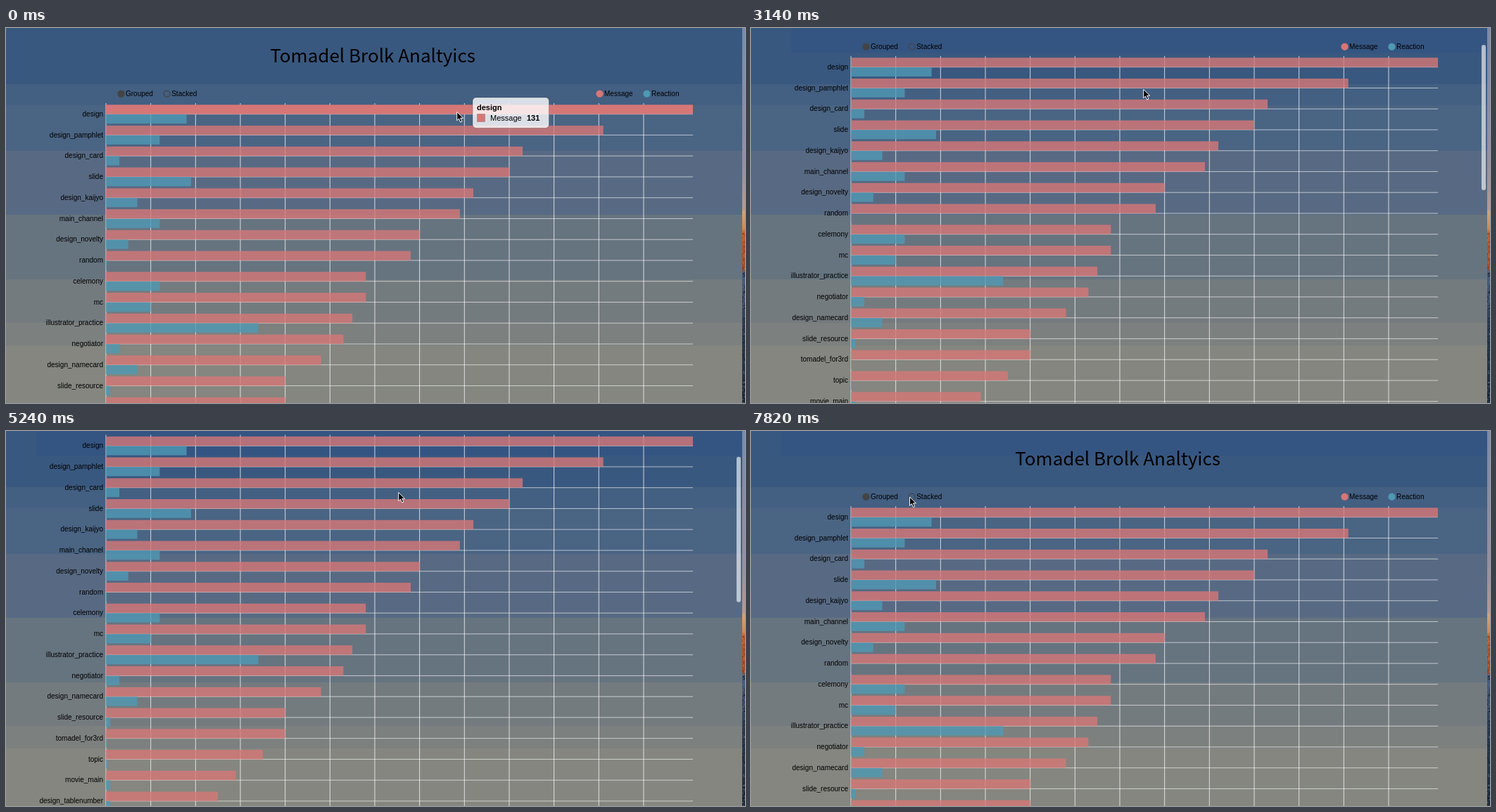
An HTML page for the animation above (8 s loop, 1050x534 px).

```html
<!DOCTYPE html>
<html lang="en">
<head>
<meta charset="utf-8">
<title>Channel analytics</title>
<style>
  html, body { margin: 0; width: 100%; height: 100%; overflow: hidden; background: #6b7580; }
  svg { display: block; width: 1050px; height: 534px; }
  text { font: 10px "Liberation Sans", Arial, sans-serif; fill: #000; }
  .title { font: 26px "Noto Sans CJK JP", "Noto Sans CJK", "Noto Sans", sans-serif; }
  .heading { font-size: 23.8px; font-weight: bold; }
  .key { font-size: 16px; }
  .tip { font-size: 11px; }
  .bold { font-weight: bold; }
  .middle { text-anchor: middle; }
  .end { text-anchor: end; }
</style>
</head>
<body>
<svg id="stage" viewBox="0 0 1050 534"></svg>
<script>
const LOOP = 8000;
const stage = document.getElementById('stage');

function add(parent, tag, attrs, text) {
  const node = document.createElementNS('http://www.w3.org/2000/svg', tag);
  for (const name in attrs) node.setAttribute(name, attrs[name]);
  if (text !== undefined) node.textContent = text;
  parent.appendChild(node);
  return node;
}
const rect = (parent, x, y, width, height, fill, more) =>
  add(parent, 'rect', { x, y, width, height, fill, ...more });
const label = (parent, x, y, text, cls = '') =>
  add(parent, 'text', { x, y, class: cls }, text);
const line = (parent, x1, y1, x2, y2, stroke, width = 1) =>
  add(parent, 'line', { x1, y1, x2, y2, stroke, 'stroke-width': width });

// Backdrop: fixed bands of colour behind the scrolling page
const bands = [
  [0, '#39587f'], [80, '#435f82'], [110, '#4a6483'], [175, '#586a83'],
  [266, '#667480'], [358, '#747b7f'], [420, '#7c807f'], [452, '#84867f']
];
bands.forEach(([y, fill], i) => {
  const bottom = i + 1 < bands.length ? bands[i + 1][0] : 534;
  rect(stage, 0, y, 1046, bottom - y, fill);
});
const shade = rect(stage, 57, 0, 989, 35, '#345582');

// Sliver of desktop at the right edge
const defs = add(stage, 'defs', {});
const desk = add(defs, 'linearGradient', { id: 'desk', x1: 0, y1: 0, x2: 0, y2: 1 });
[[0, '#7c89a8'], [.38, '#97909f'], [.485, '#b59a92'], [.49, '#d3a477'], [.535, '#cf8a55'],
 [.55, '#b9572b'], [.64, '#a04c2c'], [.655, '#4c5f80'], [.75, '#33445c'], [1, '#1c2838']]
  .forEach(([offset, color]) => add(desk, 'stop', { offset, 'stop-color': color }));
rect(stage, 1046, 0, 4, 534, 'url(#desk)');
let seed = 7;
const random = () => (seed = seed * 16807 % 2147483647) / 2147483647;
for (let i = 0; i < 110; i++) {
  const y = 292 + random() * 242;
  const fill = y < 345 ? (random() < .5 ? '#e08a45' : '#70381f') : (random() < .4 ? '#60738c' : '#141d2b');
  rect(stage, 1046 + random() * 3, y, 1.5, 2, fill, { opacity: .6 });
}

// Bar chart
const page = add(stage, 'g', {});
const LEFT = 142, RIGHT = 976, TOP = 107, BOTTOM = 704, ROW = 29.75;
const RED = '#d67777', BLUE = '#4f99b4', DARK = '#444';
const unit = (RIGHT - LEFT) / 131;
const channels = [
  ['design', 131, 18], ['design_pamphlet', 111, 12], ['design_card', 93, 3],
  ['slide', 90, 19], ['design_kaijyo', 82, 7], ['main_channel', 79, 12],
  ['design_novelty', 70, 5], ['random', 68, 0], ['celemony', 58, 12],
  ['mc', 58, 10], ['illustrator_practice', 55, 34], ['negotiator', 53, 3],
  ['design_namecard', 48, 7], ['slide_resource', 40, 1], ['tomadel_for3rd', 40, 0],
  ['topic', 35, 0], ['movie_main', 29, 1], ['design_tablenumber', 25, 1],
  ['eval_dis_competition', 25, 0], ['now_2017', 21, 0]
];

label(page, 521, 48.5, 'Tomadel Brolk Analtyics', 'title middle');

function legendDot(x, text, fill, stroke) {
  add(page, 'circle', { cx: x, cy: 93.7, r: 4.5, fill, stroke, 'stroke-width': 1.3 });
  label(page, x + 6.5, 97.3, text);
}
legendDot(163.5, 'Grouped', DARK, DARK);
legendDot(228.7, 'Stacked', 'none', DARK);
legendDot(843.5, 'Message', RED, RED);
legendDot(910.5, 'Reaction', BLUE, BLUE);

for (let v = 0; v <= 120; v += 10) {
  const x = LEFT + v * unit;
  line(page, x, TOP, x, BOTTOM, 'rgba(255,255,255,.75)');
  label(page, x, 714, v, v ? 'middle' : 'middle bold');
}
label(page, RIGHT, 714, 131, 'middle bold');

const bars = channels.map(([name, messages, reactions], i) => {
  const y = 122.7 + i * ROW;
  line(page, LEFT, y, RIGHT, y, 'rgba(255,255,255,.6)');
  label(page, 138, y + 3.2, name, 'end');
  rect(page, LEFT, y, Math.max(1, reactions * unit), 13.4, BLUE, { 'fill-opacity': .8 });
  return rect(page, LEFT, y - 13.4, messages * unit, 13.4, RED, { 'fill-opacity': .8 });
});
line(page, LEFT, BOTTOM, RIGHT, BOTTOM, DARK);

// Second chart
label(page, 536, 774, 'Channel Message Count', 'heading middle');
const keyX = [78, 172, 340.5, 474.5, 554.5, 697, 841.5, 245, 347, 462, 531, 708];
const keyColors = ['#f44336', '#e91e63', '#9c27b0', '#673ab7', '#3f51b5', '#2196f3',
  '#00bcd4', '#009688', '#4caf50', '#8bc34a', '#cddc39', '#ffeb3b'];
keyX.forEach((x, i) => {
  const y = i < 7 ? 801 : 822.5;
  rect(page, x + 1, y - 7.5, 30.5, 15, 'rgba(95,95,105,.5)',
    { stroke: keyColors[i], 'stroke-width': 2.4, 'stroke-opacity': .9 });
  label(page, x + 39.5, y + 5.5, channels[i][0], 'key');
});
label(page, 59, 840.5, 140, 'end');
line(page, 60, 837, 1008, 837, 'rgba(0,0,0,.13)');
for (let i = 0; i <= 14; i++) {
  const x = 67 + i * 67.2;
  line(page, x, 837, x, 900, 'rgba(0,0,0,.13)');
}

// Tooltip
const tooltip = add(stage, 'g', {});
rect(tooltip, 663, 99, 108.5, 43.5, 'rgba(255,255,255,.8)',
  { rx: 5, stroke: 'rgba(0,0,0,.22)' });
label(tooltip, 669, 116.5, 'design', 'tip bold');
rect(tooltip, 669.5, 122.5, 11, 11, RED, { stroke: '#a88', 'stroke-width': .7 });
label(tooltip, 688, 132.2, 'Message', 'tip');
label(tooltip, 740, 132.2, 131, 'tip bold');

const thumb = rect(stage, 1038, 0, 6, 207, 'rgba(255,255,255,.62)', { rx: 3 });
const cursor = add(stage, 'path', {
  d: 'M0 0V12.2L2.8 9.6L5 14.6L7.2 13.6L5 8.8H9Z',
  fill: '#000', stroke: '#fff', 'stroke-width': 1, 'stroke-linejoin': 'round'
});

// Each track holds its values from one time to the next
const scrollTrack = [
  [0, 0], [2600, 3.5], [2750, 13], [2940, 36], [3130, 67], [3320, 101], [3520, 137],
  [3700, 169.7], [3910, 212], [4090, 250], [4280, 288], [4470, 314], [4650, 321],
  [4860, 290], [5050, 200], [5240, 101.5], [5450, 35], [5650, 4.2], [5830, 0]
];
const cursorTrack = [
  [0, 640.7, 119.5], [900, 597, 103], [1070, 566, 90], [1250, 557.7, 87.5],
  [6160, 520, 88], [6310, 430, 89], [6470, 330, 90], [6620, 262, 91], [6780, 238, 91],
  [7380, 235, 91.5], [7530, 231, 92.5], [7670, 227, 93.5], [7820, 225.5, 94]
];
const tooltipTrack = [[0, 1], [900, .85], [1070, .4], [1250, 0]];
const thumbTrack = [[0, 0], [2600, 1], [6160, .75], [6310, .4], [6470, .15], [6620, 0]];
const shadeTrack = [[0, 57, 0], [2600, 57, 1], [3320, 45, 1], [4280, 43, 0], [4860, 43, 1]];

function at(track, time) {
  let i = track.length - 1;
  while (i > 0 && track[i][0] > time) i--;
  return track[i].slice(1);
}

function draw(time) {
  const [scroll] = at(scrollTrack, time);
  const [x, y] = at(cursorTrack, time);
  const [shadeX, shadeOpacity] = at(shadeTrack, time);
  page.setAttribute('transform', `translate(0 ${-scroll})`);
  cursor.setAttribute('transform', `translate(${x} ${y})`);
  bars[0].setAttribute('fill-opacity', time < 900 ? 1 : .8);
  tooltip.setAttribute('opacity', at(tooltipTrack, time)[0]);
  thumb.setAttribute('y', scroll * .366 - .5);
  thumb.setAttribute('opacity', at(thumbTrack, time)[0]);
  shade.setAttribute('x', shadeX);
  shade.setAttribute('width', 1046 - shadeX);
  shade.setAttribute('opacity', shadeOpacity);
}

const start = performance.now();
function tick() {
  draw((performance.now() - start) % LOOP);
  requestAnimationFrame(tick);
}
tick();
</script>
</body>
</html>
```
